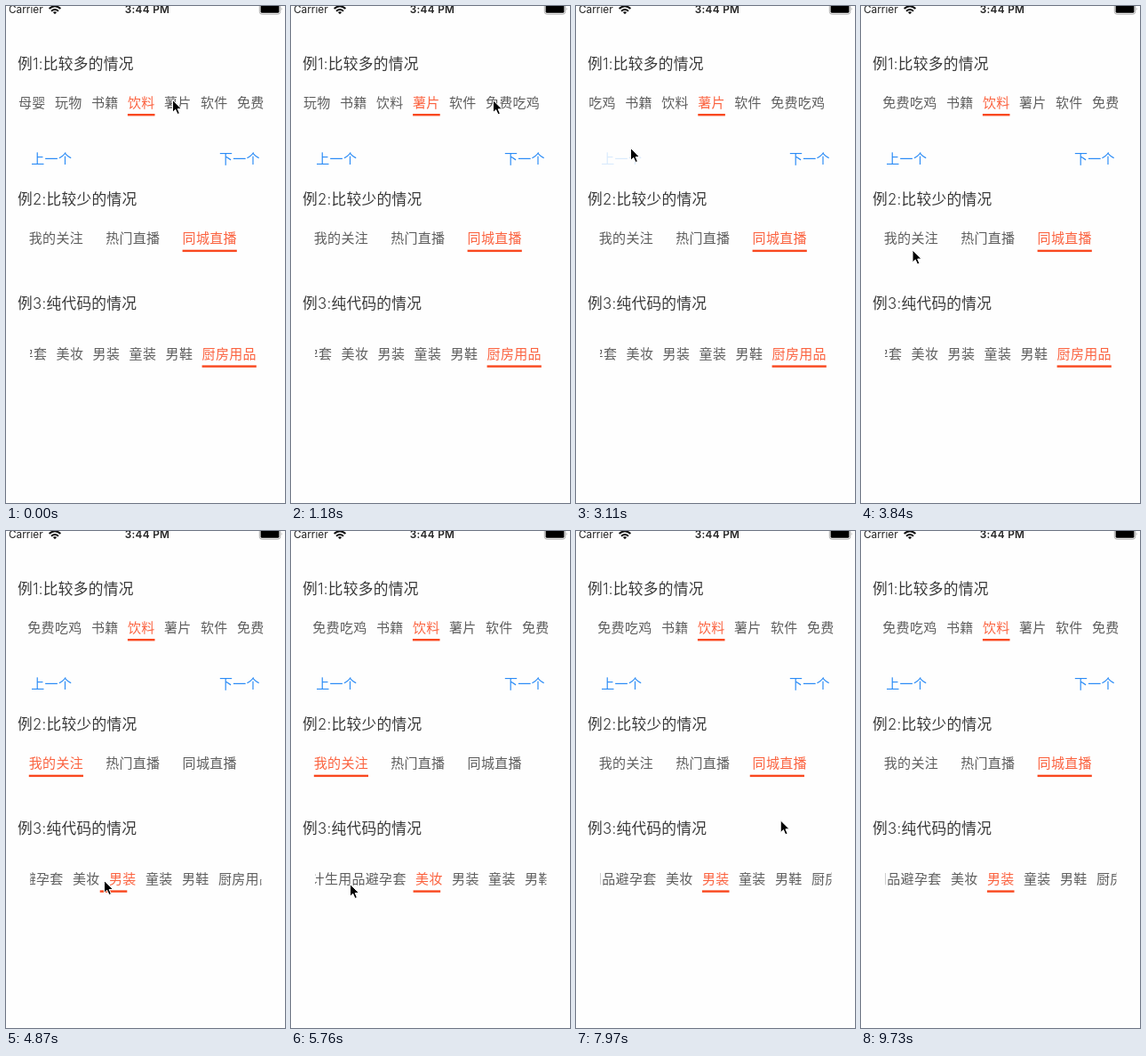
Write an HTML page that moves like this. It is 314 by 558 pixels and loops after 9880 ms.

```html
<!DOCTYPE html>
<html lang="zh-CN">
<head>
<meta charset="utf-8">
<style>
  html, body { margin: 0; height: 100%; overflow: hidden; background: #fefefe; }
  svg { display: block; }
  #stage { width: 100vw; height: 100vh; }
  text { font: 300 15px "Noto Sans CJK SC", "Noto Sans CJK", sans-serif; letter-spacing: .3px; fill: #5e5e5e; }
  .title { font: 300 16.7px Inter, "Noto Sans CJK SC", "Noto Sans CJK", sans-serif; fill: #383838; }
  .button { fill: #2a8bf6; }
  .status { font: 400 11.8px Inter, sans-serif; letter-spacing: 0; fill: #222; }
  .time { font-weight: 600; letter-spacing: .3px; text-anchor: middle; }
  .on { fill: #fb623f; }
  .bar { fill: #f9481f; }
</style>
</head>
<body>
<svg id="stage" viewBox="0 0 314 558">
  <text class="status" x="3" y="8">Carrier</text>
  <g fill="none" stroke="#111" stroke-width="2">
    <path d="M48.6 3Q55 -2.6 61.4 3M51 5.7Q55 2.2 59 5.7"/>
    <path d="M55 9.2L52.9 7.1Q55 5.6 57.1 7.1Z" fill="#111" stroke="none"/>
  </g>
  <text class="status time" x="159" y="8">3:44 PM</text>
  <rect x="285.3" y="-3" width="23.4" height="12.2" rx="2.8" fill="none" stroke="#999" stroke-width=".8"/>
  <rect x="286.6" y="-2" width="20.8" height="9.8" rx="1.6"/>
  <path d="M309.8 1.4q1.5 1.4 0 3.8z" fill="#999"/>
  <text class="title" x="13" y="71">例1:比较多的情况</text>
  <text class="title" x="13" y="223.2">例2:比较少的情况</text>
  <text class="title" x="13" y="340">例3:纯代码的情况</text>
  <g id="content"></g>
  <path id="cursor" d="M0 0V13.8L3.2 10.8L5.5 16L7.9 15L5.7 10H10Z" stroke="#fff"/>
</svg>
<script>
const LOOP = 9880, HOLD = 600, STEP = 147.2, LAST_STEP = 62;
const CHAR = 15.3, TAP_REACH = 18;
const content = document.getElementById('content');
const cursor = document.getElementById('cursor');

function add(parent, tag, attrs, text = '') {
  const el = document.createElementNS('http://www.w3.org/2000/svg', tag);
  for (const key in attrs) el.setAttribute(key, attrs[key]);
  el.textContent = text;
  return parent.appendChild(el);
}

const clamp = (v, lo, hi) => Math.min(hi, Math.max(lo, v));
const mix = (a, b, k) => a + (b - a) * k;
const ease = k => (1 - Math.cos(Math.PI * clamp(k, 0, 1))) / 2;
const spring = s => 1 - Math.exp(-9.6 * s) * (Math.cos(17.3 * s) + .555 * Math.sin(17.3 * s));

function makeRow(tabs, selected, y, left, right, gap, pad) {
  const top = y - 15, width = right - left;
  const view = add(content, 'svg', {
    x: left, y: top, width, height: 36, viewBox: `${left} ${top} ${width} 36`
  });
  const group = add(view, 'g', {});
  let x = 0;
  const items = tabs.split(' ').map(name => {
    const w = name.length * CHAR;
    const item = { w, center: x + w / 2, el: add(group, 'text', { x, y: y + 5.5 }, name) };
    x += w + gap;
    return item;
  });
  const bar = add(group, 'rect', { class: 'bar', y: y + 13, height: 2.4 });
  const minShift = right - pad - (x - gap);
  // a selected tab is centred unless that would scroll past an end
  const shift = item => clamp((left + right) / 2 - item.center, minShift, left + pad);
  return { y, gap, items, group, bar, shift, history: [{ time: -LOOP, index: selected }] };
}

const rows = [
  makeRow('母婴 玩物 书籍 饮料 薯片 软件 免费吃鸡 书籍 饮料 薯片 软件 免费吃鸡', 3, 108, 14, 290.4, 10.4, 10),
  makeRow('我的关注 热门直播 同城直播', 2, 260.7, 25, 261, 25.2, .8),
  makeRow('纯代码构造 计生用品避孕套 美妆 男装 童装 男鞋 厨房用品', 6, 390.4, 27, 287.4, 10.4, 5.6)
];

const buttons = [['上一个', 28.3, -1], ['下一个', 240, 1]].map(([name, x, step]) =>
  ({ x, y: 172, step, el: add(content, 'text', { class: 'button', x, y: 177.2 }, name) }));

// pointer stops: time of the tap, x, y
const stops = [
  [500, 187.5, 105.5], [1480, 249.5, 106], [2060, 249.5, 106], [2480, 262, 171],
  [3190, 61.5, 159.5], [3950, 58, 274], [4735, 110.5, 392.5], [5492, 110.5, 392.5],
  [5900, 66.5, 396.5], [7000, 273.5, 402], [7640, 228, 257],
  [8550, 238, 562], [8730, 238, 562], [9850, 316, 100]
];

// record which tab or button each tap hits
const selectedIn = row => row.history.at(-1).index;
for (const [time, x, y] of stops) {
  const near = target => Math.abs(y - target.y) < TAP_REACH;
  const row = rows.find(near);
  const button = buttons.find(b => near(b) && x > b.x && x < b.x + 3 * CHAR);
  if (row) {
    const offset = row.shift(row.items[selectedIn(row)]);
    const index = row.items.findIndex(i => Math.abs(x - offset - i.center) < (i.w + row.gap) / 2);
    row.history.push({ time, index });
  } else if (button) {
    button.time = time;
    rows[0].history.push({ time, index: selectedIn(rows[0]) + button.step });
  }
}

function drawRow({ items, history, shift, group, bar }, t) {
  const n = history.findLastIndex(h => h.time <= t);
  const { time, index } = history[n];
  const from = items[history[Math.max(0, n - 1)].index], to = items[index];
  const age = (t - time) / 1000, k = spring(age);
  const w = mix(from.w, to.w, Math.min(1, k));
  group.setAttribute('transform', `translate(${mix(shift(from), shift(to), ease(age / .3))} 0)`);
  bar.setAttribute('x', mix(from.center, to.center, k) - w / 2);
  bar.setAttribute('width', w);
  items.forEach((item, i) => item.el.setAttribute('class', i === index ? 'on' : ''));
}

function drawButton({ el, time }, t) {
  el.setAttribute('opacity', t < time - 150 ? 1 : mix(.17, 1, ease((t - time) / 250)));
}

// the pointer rests briefly around each tap
function drawCursor(t) {
  const i = Math.max(1, stops.findIndex(s => s[0] > t));
  const [t0, x0, y0] = stops[t < LAST_STEP * STEP + HOLD ? i - 1 : stops.length - 1];
  const [t1, x1, y1] = stops[i];
  const leave = t0 + 120, arrive = t1 - 150;
  const k = ease((t - leave) / (arrive - leave));
  cursor.setAttribute('transform', `translate(${mix(x0, x1, k)} ${mix(y0, y1, k)})`);
}

function draw(now) {
  const clock = now % LOOP;
  // time advances in even steps after an opening hold
  const t = clock < HOLD ? 0 : HOLD + STEP * Math.min(LAST_STEP, Math.floor((clock - HOLD) / STEP));
  rows.forEach(row => drawRow(row, t));
  buttons.forEach(button => drawButton(button, t));
  drawCursor(t);
}

const begin = performance.now();
function tick() {
  draw(performance.now() - begin);
  requestAnimationFrame(tick);
}
tick();
</script>
</body>
</html>
```
